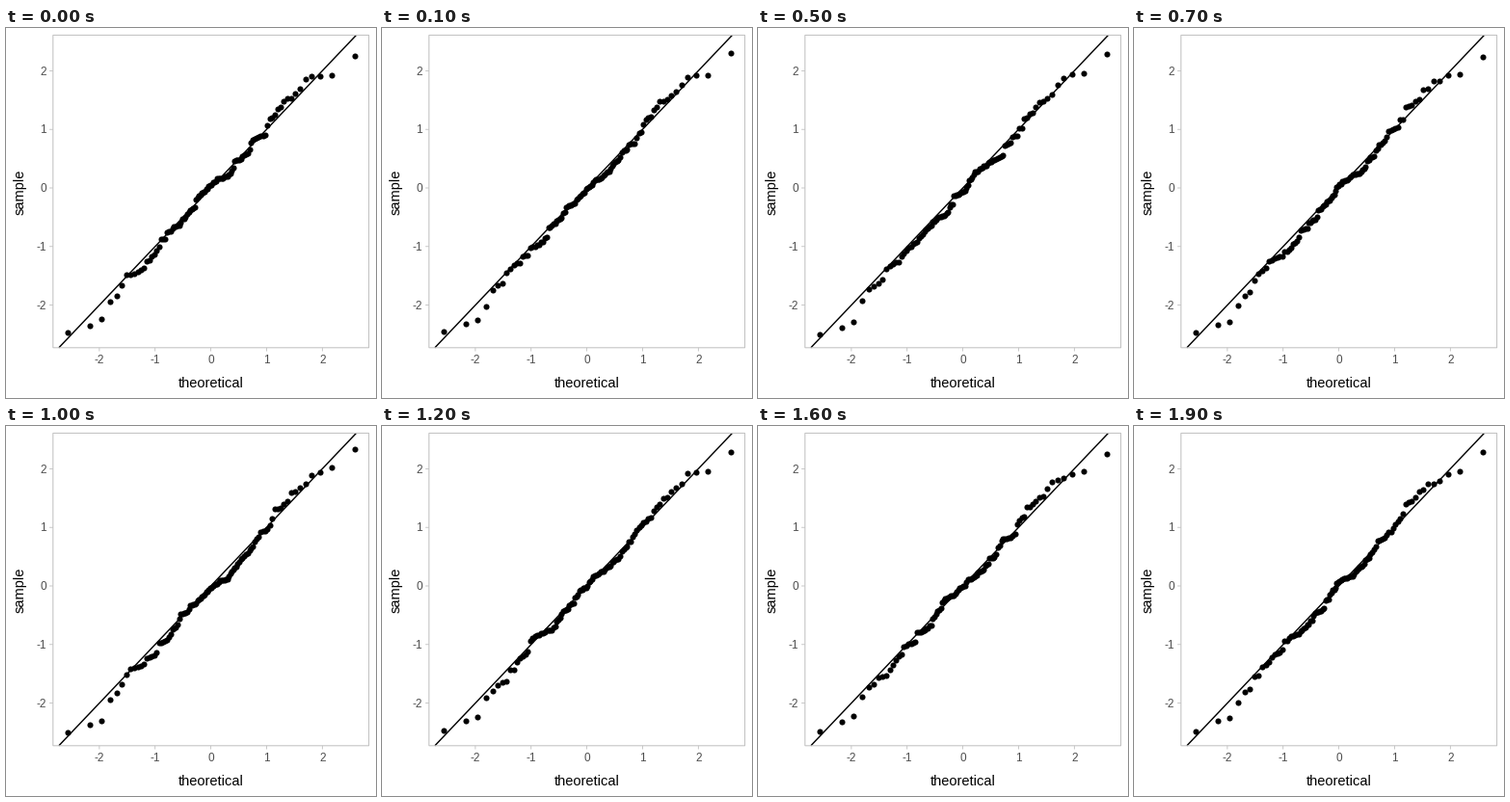
A matplotlib script for the animation above (2 s loop, 384 px wide and 384 px high).

```python
import math

import matplotlib.pyplot as plt
import numpy as np
from matplotlib.animation import FuncAnimation
from matplotlib.patches import Rectangle

SIZE, DPI = 384, 96
FRAMES, INTERVAL = 20, 100
N = 100
PT = 72 / DPI  # points per pixel

LEFT, TOP, RIGHT, BOTTOM = 48.8, 7.4, 376.6, 331.8
X0, Y0 = 212.6, 166.0
X_UNIT, Y_UNIT = 57.85, 60.8

plt.rcParams["font.family"] = "Liberation Sans"
plt.rcParams["axes.unicode_minus"] = False
plt.rcParams["path.snap"] = False


def px(x):
    return X0 + X_UNIT * x


def py(y):
    return Y0 - Y_UNIT * y


def normal_quantiles(n):
    grid = np.linspace(-4, 4, 4001)
    cdf = [0.5 * (1 + math.erf(g / math.sqrt(2))) for g in grid]
    return np.interp((np.arange(n) + 0.5) / n, cdf, grid)


THEORY = normal_quantiles(N)

# The average sample follows the diagonal but bends at both tails.
BEND_X = [-2.58, -2.17, -1.96, -1.81, -1.37, 0, 0.54, 1.10, 1.81, 2.17, 2.58]
BEND_Y = [-2.47, -2.34, -2.27, -1.95, -1.41, 0, 0.45, 1.17, 1.90, 1.97, 2.30]
CENTRE = np.interp(THEORY, BEND_X, BEND_Y)

# Points move freely in the middle and hardly at the tails.
JITTER = 0.03 + 0.10 * np.clip(2.1 - np.abs(THEORY), 0, 1)


def sample(frame):
    rng = np.random.default_rng(frame)
    return np.sort(CENTRE + JITTER * rng.normal(size=N).clip(-2, 2))


fig = plt.figure(figsize=(SIZE / DPI, SIZE / DPI), dpi=DPI, facecolor="white")
ax = fig.add_axes([0, 0, 1, 1])
ax.set_xlim(0, SIZE)
ax.set_ylim(SIZE, 0)
ax.axis("off")


def stroke(xs, ys, color, width):
    ax.plot(xs, ys, color=color, lw=width * PT, solid_capstyle="butt")


def label(x, y, text, size=11, color="black", ha="center", va="baseline", **kw):
    ax.text(x, y, text, fontsize=size, color=color, ha=ha, va=va, **kw)


low, high = (Y0 - BOTTOM) / Y_UNIT, (Y0 - TOP) / Y_UNIT
stroke([px(low), px(high)], [BOTTOM, TOP], "black", 1.42)
dots, = ax.plot([], [], "o", color="black", ms=6.1 * PT, mew=0, snap=False)
ax.add_patch(Rectangle((LEFT, TOP), RIGHT - LEFT, BOTTOM - TOP, fill=False,
                       ec="#c0c0c0", lw=PT, zorder=3))

for v in range(-2, 3):
    x, y = px(v), py(v)
    stroke([x, x], [BOTTOM, BOTTOM + 3.7], "#b3b3b3", 0.71)
    stroke([LEFT - 3.7, LEFT], [y, y], "#b3b3b3", 0.71)
    label(x, 348, str(v), 8.8, "#4d4d4d")
    label(42, y + 4.2, str(v), 8.8, "#4d4d4d", ha="right")

label(X0, 373, "theoretical")
label(14.5, 170, "sample", va="center", rotation=90)


def draw(frame):
    dots.set_data(px(THEORY), py(sample(frame)))
    return dots,


anim = FuncAnimation(fig, draw, frames=FRAMES, interval=INTERVAL,
                     init_func=lambda: draw(0), repeat=True, repeat_delay=0)
plt.show()
```
